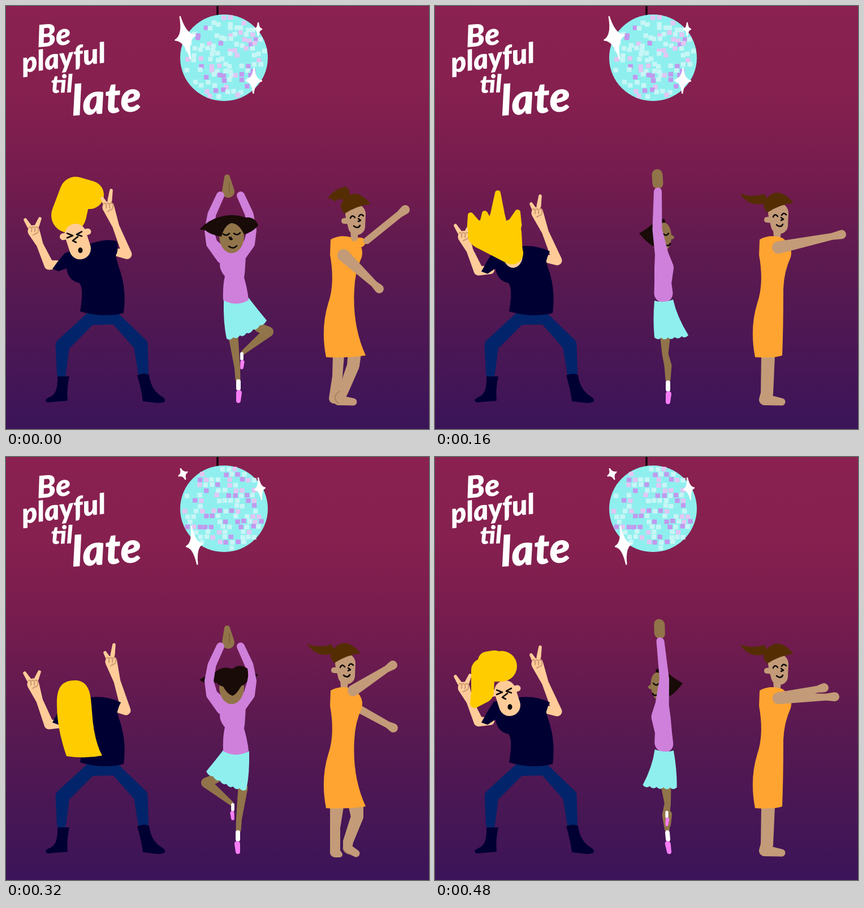
These frames come from a looping animation (748 by 748 pixels, 640 ms). An HTML page:

```html
<!DOCTYPE html>
<html lang="en">
<head>
<meta charset="utf-8">
<title>Dance floor</title>
<style>
  html, body { margin: 0; width: 100%; height: 100%; overflow: hidden; background: #5c1a50; }
  svg { display: block; width: 100vw; height: 100vh; }
  .slogan { fill: #fff; font: italic 900 40px Lato, "Open Sans", sans-serif; }
</style>
</head>
<body>
<svg id="stage" viewBox="0 0 748 748"></svg>
<script>
const STEP = 160;
const C = {
  yellow: '#ffcc00', peach: '#ffcc99', knuckle: '#cf9d74', navy: '#000033', denim: '#02246a',
  brown: '#917449', black: '#190b08', lilac: '#cf80db', aqua: '#8fefee', pink: '#f77df5',
  tan: '#c39b78', chestnut: '#552d02', orange: '#ffa430', ink: '#0a0508', white: '#fff'
};

const fill = (color, d) => `<path d="${d}" fill="${color}"/>`;
const line = (width, d, color = C.ink) =>
  `<path d="${d}" fill="none" stroke="${color}" stroke-width="${width}" stroke-linecap="round" stroke-linejoin="round"/>`;
const oval = (color, x, y, rx, ry) => `<ellipse cx="${x}" cy="${y}" rx="${rx}" ry="${ry}" fill="${color}"/>`;
const group = (transform, body) => `<g transform="${transform}">${body}</g>`;
const move = (x, y, body) => group(`translate(${x} ${y})`, body);
const flip = (sum, body) => group(`matrix(-1 0 0 1 ${sum} 0)`, body);
const mix = (a, b, t) => a + (b - a) * t;

// Tapered tube through joints, each given as [x, y, radius].
function limb(color, ...joints) {
  let d = '';
  for (let i = 1; i < joints.length; i++) {
    const [x1, y1, r1] = joints[i - 1], [x2, y2, r2] = joints[i];
    const a = Math.atan2(y2 - y1, x2 - x1);
    const b = Math.acos((r1 - r2) / Math.hypot(x2 - x1, y2 - y1));
    const on = (x, y, r, t) => `${x + r * Math.cos(t)} ${y + r * Math.sin(t)}`;
    const wide = b > Math.PI / 2 ? 1 : 0;
    d += `M${on(x1, y1, r1, a + b)}L${on(x2, y2, r2, a + b)}A${r2} ${r2} 0 ${wide} 0 ${on(x2, y2, r2, a - b)}` +
      `L${on(x1, y1, r1, a - b)}A${r1} ${r1} 0 ${1 - wide} 0 ${on(x1, y1, r1, a + b)}Z`;
  }
  return fill(color, d);
}

// Sagging hem of n small waves.
function hem(x1, y1, x2, y2, n, sag) {
  let d = '';
  for (let i = 1; i <= n; i++) {
    const at = t => [mix(x1, x2, t), mix(y1, y2, t) + sag * Math.sin(Math.PI * t)];
    const [cx, cy] = at((i - 0.5) / n);
    d += `Q${cx} ${cy + 6} ${at(i / n)}`;
  }
  return d;
}

// Disco ball
function star(x, y, w, h, lean) {
  const k = 0.12, a = w * k, b = h * k;
  const d = `M0 ${-h}Q${a} ${-b} ${w} 0Q${a} ${b} 0 ${h}Q${-a} ${b} ${-w} 0Q${-a} ${-b} 0 ${-h}Z`;
  return group(`translate(${x} ${y}) rotate(${lean})`,
    `<path d="${d}" fill="#fff" stroke="#fff" stroke-width="2.5" stroke-linejoin="round"/>`);
}

function seeded(seed) {
  return () => (seed = (seed * 16807) % 2147483647) / 2147483647;
}

function ball(seed, jitter, stars) {
  const rnd = seeded(seed), tones = ['#c299ee', '#e3c6f3', '#c8f6f6', '#c8f6f6'];
  const shake = () => (rnd() - 0.5) * jitter;
  let out = line(3.5, 'M374 0V17', '#14060d') + oval(C.aqua, 385.5, 91.5, 77.5, 76.5);
  for (let y = 22; y < 164; y += 9.2) {
    for (let x = 310 + rnd() * 6; x < 462; x += 10.5) {
      const px = x + shake(), py = y + shake(), tone = tones[Math.floor(rnd() * tones.length)];
      if (rnd() < 0.36 || Math.hypot(px - 386, py - 91) > 73) continue;
      out += `<rect x="${px - 4}" y="${py - 4}" width="8.4" height="8" fill="${tone}"/>`;
    }
  }
  return out + stars;
}

const ballA = ball(41, 6, star(317, 56, 18, 38, -14) + star(446, 41, 6, 11, 0) + star(438, 132, 14, 22, 2));
const ballB = ball(97, 2, star(313, 30, 8, 10, -25) + star(449, 56, 9, 19, -9) + star(333, 156, 14, 34, -9));

// Head-banger
const boots = fill(C.navy, 'M91 655H112Q107 675 109 698L74 701Q64 697 80 690 92 684 91 655Z') +
  fill(C.navy, 'M232 653Q243 648 253 652 256 680 278 692 288 702 268 702L242 699Q240 680 232 653Z');
const legs = limb(C.denim, [98, 650, 8], [100, 600, 12.5], [149, 553, 11], [194, 553, 10], [238, 599, 12.5], [243, 650, 9]) + boots;

// Arm with the first and last finger raised; tips are relative to the hand.
function horns(shoulder, [ex, ey], [hx, hy], tips) {
  const wrist = [mix(ex, hx, 0.6), mix(ey, hy, 0.6), 6];
  const fingers = tips.map(([x, y]) => limb(C.peach, [hx + x * 0.5, hy + y * 0.4, 4], [hx + x, hy + y, 2.8]));
  const folds = [-6, 0, 6].map(x => `M${hx + x - 2} ${hy - 7}q6-1 4 8`).join('') + `M${hx + 7} ${hy + 3}l-8 4`;
  return limb(C.peach, [...shoulder, 7], [ex, ey, 8.5], wrist, [hx, hy, 10.5]) +
    fingers.join('') + line(2.3, folds, C.knuckle);
}
const leftArm = (elbow, hand) => horns([98, elbow[1] - 1], elbow, hand, [[-15, -20], [11, -22]]);
const rightArm = (elbow, hand) => horns([198, elbow[1] - 3], elbow, hand, [[-11, -16], [5, -30]]);

const shirt = drop => fill(C.navy, `M104 ${437 - drop / 2}Q92 450 82 ${465 + drop / 2}L93 ${469 + drop / 2} 107 464
  Q110 486 130 490 138 500 131 540 170 552 208 543 214 500 199 460L${194 + drop * 0.3} ${442 + drop}
  Q200 ${430 + drop} ${196 + drop * 0.8} ${416 + drop * 2}Q172 ${409 + drop} 130 428Z`);
const rockerFace = limb(C.peach, [123, 404, 19], [131, 429, 19]) +
  limb(C.peach, [101, 408, 6], [145, 399, 5.5]) +
  line(2.6, 'M108 402L118 406 108 410M134 399L125 404 134 407M127 408L118 415 124 418') +
  oval(C.ink, 131.5, 432, 4, 5);

const hairUp = limb(C.yellow, [111, 370, 31], [123, 330, 28], [148, 334, 25]);
const hairWild = limb(C.yellow, [136, 437, 20], [83, 404, 25]) + limb(C.yellow, [136, 437, 19], [133, 400, 20]) +
  [[111, 331], [63, 370], [88, 367], [146, 365]].map(([x, y]) =>
    limb(C.yellow, [mix(108, x, 0.3), 410, 24], [mix(108, x, 0.85), mix(410, y, 0.5), 13], [x, y, 5])).join('');
const hairDown = fill(C.yellow, 'M90 440C89 402 102 395 125 395C150 398 150 425 152 450Q155 500 170 528 140 534 107 529 90 480 90 440Z');
const hairSide = limb(C.yellow, [118, 370, 27], [85, 377, 21], [84, 415, 20], [70, 436, 8]) + limb(C.yellow, [105, 362, 20], [92, 360, 16]);

const lowArms = leftArm([77, 468], [51, 408]) + rightArm([216, 450], [181, 366]);
const rocker = [
  hairUp + leftArm([76, 458], [49, 398]) + rightArm([214, 439], [181, 356]) + shirt(0) + rockerFace,
  lowArms + shirt(9) + oval(C.peach, 138, 441, 17, 22) + hairWild,
  leftArm([76, 473], [48, 402]) + rightArm([212, 448], [186, 362]) + shirt(9) + hairDown,
  lowArms + shirt(9) + move(1, 10, rockerFace) + hairSide
].map(pose => legs + pose);

// Ballerina
const shoe = (x, y, size) => limb(C.white, [x, y, 4 * size], [x, y + 12 * size, 4 * size]) +
  limb(C.pink, [x + 1, y + 20 * size, 5 * size], [x, y + 34 * size, 4 * size]);
const palms = limb(C.brown, [391, 303, 5], [393, 328, 11]) + line(1.5, 'M395 312V330', '#7a5e38');
const raised = limb(C.lilac, [379, 335, 7], [364, 368, 7.5], [359, 396, 8], [364, 420, 10], [384, 443, 13]);
const torso = raised + flip(794, raised) +
  fill(C.lilac, 'M376 436H424Q423 470 421 480 427 500 429 520 407 533 384 520 383 495 387 478 374 462 380 450Z');
const face = oval(C.brown, 399, 407, 22, 30);
const skirt = fill(C.aqua, `M385 520Q407 531 429 516 446 538 461 556${hem(461, 556, 390, 588, 6, 6)}Q384 560 385 520Z`);
const tiptoe = limb(C.brown, [402, 585, 8.5], [409, 640, 5], [410, 660, 4.5]) + shoe(411, 664, 1);
const bentLeg = limb(C.brown, [446, 568, 8], [464, 576, 9], [420, 612, 4]) + shoe(417, 615, 0.72);
const frontHair = fill(C.black, 'M342 395Q358 378 378 373 400 366 424 374 440 372 446 388 436 400 421 404 412 384 398 384 386 388 381 408 360 404 353 397Z');
const features = line(2.5, 'M384 403q6 5 11-1M403 402q6 5 11-1M395 409q1 6 5 3M394 425q8 6 14-1M398 409v2');
const backHair = fill(C.black, 'M370 380Q385 368 400 375 412 364 427 374 432 400 416 405 406 422 400 422 392 420 384 406 366 402 370 380Z');
const wings = fill(C.black, 'M342 394Q394 360 446 385L430 399H350Z');
const turned = limb(C.brown, [393, 298, 9.5], [394, 314, 9.5]) +
  fill(C.black, 'M361 402Q378 392 386 384 392 374 406 377 410 388 398 412L386 425Q374 418 361 402Z') +
  oval(C.brown, 405, 408, 13, 25) + limb(C.brown, [412, 408, 6], [420, 409, 3]) +
  line(2.5, 'M404 403q5 5 9-1M409 423q5 2 7-3') +
  limb(C.brown, [407, 588, 8.5], [407, 615, 5.5], [412, 636, 6.5], [412, 660, 4.5]) + shoe(412, 666, 1) +
  limb(C.lilac, [394, 328, 7], [393, 395, 8.5], [401, 440, 12], [405, 463, 17], [403, 490, 15], [404, 508, 16.5]) +
  fill(C.aqua, `M388 521Q404 526 421 519 428 550 448 582${hem(448, 582, 388, 586, 5, 2)}Q385 555 388 521Z`);
const ballerina = [
  tiptoe + bentLeg + skirt + palms + torso + face + frontHair + features,
  turned,
  flip(821, tiptoe) + flip(818, bentLeg) + flip(815, skirt) + wings + palms + torso + face + backHair,
  group('matrix(-1 0 .09 1 763 -2)', turned) + limb(C.brown, [411, 632, 8], [411, 650, 6]) + shoe(410, 628, 0.65)
];

// Dancer in the orange dress
const reach = (x, y, r, hx, hy) =>
  limb(C.tan, [x, y, r], [mix(x, hx, 0.85), mix(y, hy, 0.85), 6], [hx, hy, 8]);
const dress = (bend, edge) => fill(C.orange, `M574 413Q592 403 614 410 634 424 629 444 617 470 616 500
  ${bend} 565 ${edge} 618 600 623 566 621 556 570 570 525 582 490 573 440Z`);
const wideDress = dress(612, 636), slimDress = dress(616, 614);
const sleeve = limb(C.orange, [612, 421, 11], [627, 418, 8.5]);

const smile = line(2.6, 'M598 373q3-7 8-1M613 370q3-6 8-1M612 374l4 3-4 2M604 387q7 6 11-1');
const head = limb(C.tan, [607, 366, 18], [609, 388, 15]) + limb(C.tan, [587, 378, 5], [600, 378, 6]) +
  limb(C.tan, [605, 395, 7], [605, 408, 6]) +
  fill(C.chestnut, 'M581 348Q603 312 634 348 610 351 588 365 580 360 581 348Z') + smile;
const flyingTail = fill(C.chestnut, 'M539 331Q560 340 582 332L590 345Q575 354 560 349 548 345 539 331Z');
const sideHead = flyingTail + head;
const tallHead = move(11, 2, head) + fill(C.chestnut, 'M569 341Q576 326 600 319 614 326 602 344 588 338 581 346 577 340 569 341Z');

const stand = limb(C.tan, [589, 618, 12], [587, 685, 11], [583, 696, 10], [613, 700, 6.5]);
const stepA = limb(C.tan, [588, 618, 10], [586, 655, 9], [580, 694, 9]) +
  limb(C.tan, [616, 618, 11.5], [614, 636, 11], [597, 680, 9], [588, 697, 9], [614, 700, 6.5]) +
  line(1.5, 'M590 681q-12 8-6 18l4 4', '#a27b58');
const stepB = limb(C.tan, [585, 618, 12], [582, 655, 9], [582, 699, 9], [590, 703, 5]) +
  limb(C.tan, [619, 618, 13], [621, 636, 11], [605, 680, 9], [604, 692, 8], [619, 701, 6.5]) +
  line(1.5, 'M596 692q2 9 14 11', '#a27b58');
const swinger = [
  stepA + wideDress + sleeve + reach(638, 415, 6, 706, 360) + reach(597, 441, 11, 660, 500) + tallHead,
  stand + sideHead + slimDress + reach(607, 427, 11, 719, 404),
  stepB + reach(622, 444, 7, 685, 479) + move(-7, -1, sideHead) + wideDress + reach(614, 413, 10, 684, 368),
  stand + sideHead + slimDress + reach(607, 426, 10, 688, 408) + reach(607, 427, 10, 707, 424)
];

const word = (text, x, y, size, turn) =>
  `<text class="slogan" style="font-size:${size}px" transform="translate(${x} ${y}) rotate(${turn})">${text}</text>`;
const slogan = word('Be', 56, 73, 54, -5) + word('playful', 30, 118, 50, -7) +
  word('til', 80, 154, 44, -2) + word('late', 118, 194, 75, -4);

const dusk = ['#8a2150', '#86204f', '#751c4e', '#5d1a50', '#4b1754', '#3b1459'];
const stops = dusk.map((color, i) => `<stop offset="${i / 5}" stop-color="${color}"/>`).join('');
const stage = document.getElementById('stage');
stage.innerHTML = `<defs><linearGradient id="dusk" x2="0" y2="1">${stops}</linearGradient></defs>
  <rect width="748" height="748" fill="url(#dusk)"/>${slogan}` +
  rocker.map((pose, i) => `<g class="pose">${i < 2 ? ballA : ballB}${pose}${ballerina[i]}${swinger[i]}</g>`).join('');
const poses = [...stage.querySelectorAll('.pose')];

function render(ms) {
  const now = Math.floor(ms / STEP) % poses.length;
  poses.forEach((pose, i) => pose.setAttribute('display', i === now ? 'inline' : 'none'));
}

const start = performance.now();
function tick() {
  render(performance.now() - start);
  requestAnimationFrame(tick);
}
render(0);
requestAnimationFrame(tick);
</script>
</body>
</html>
```
